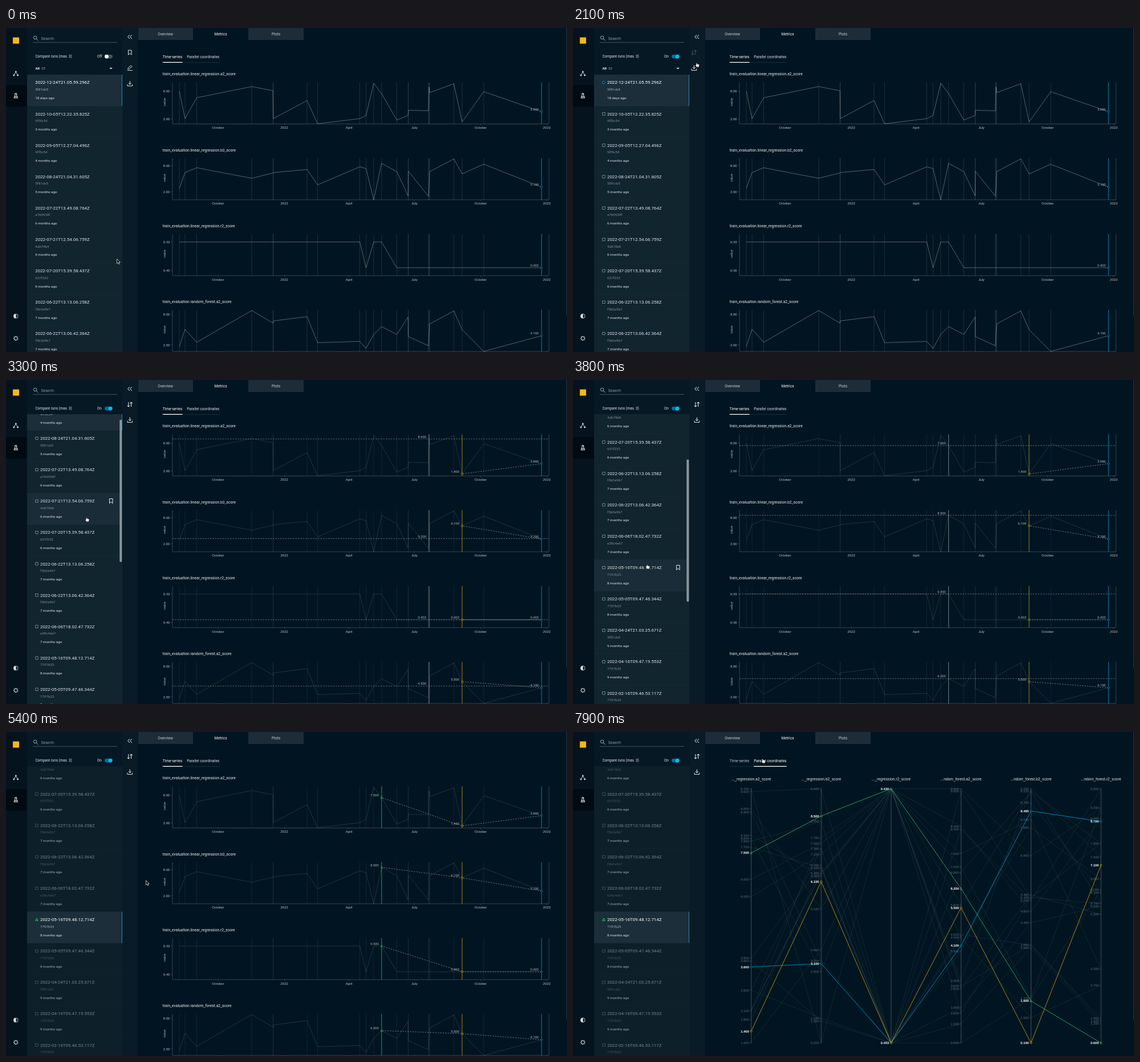
Animation, 984 px wide and 569 px high, one loop 8000 ms. Source, as an HTML page:

```html
<!DOCTYPE html>
<html lang="en">
<head>
<meta charset="utf-8">
<title>Run metrics</title>
<style>
html, body { margin: 0; width: 100%; height: 100%; overflow: hidden; background: #001521; }
svg { display: block; width: 984px; height: 569px; }
text { font-family: Roboto, sans-serif; }
text.ax { font-family: "Liberation Sans", Arial, sans-serif; }
</style>
</head>
<body>
<svg id="stage" viewBox="0 0 984 569">
  <defs><clipPath id="listClip"><rect x="37" y="60" width="168" height="509"/></clipPath></defs>
  <g id="back"></g>
  <g id="list" clip-path="url(#listClip)"></g>
  <g id="tools"></g>
  <g id="main"></g>
  <g id="cursor"></g>
</svg>
<script>
const LOOP = 8000, STEP = 100;
const ROW = 55.1, LIST_TOP = 82, SCROLL = 317.3;
const BG = '#001521', WHITE = '#fff';
const BLUE = '#00bcff', AMBER = '#ffbc00', GREEN = '#31e27b';

const runs = [
  ['2022-12-24T21.05.59.296Z', '5f81cb5', '18 days'],
  ['2022-10-05T12.22.35.825Z', '9ff5c54', '3 months'],
  ['2022-09-05T12.27.04.496Z', '9ff5c54', '4 months'],
  ['2022-08-24T21.04.31.605Z', '5f81cb5', '5 months'],
  ['2022-07-22T13.49.08.764Z', 'a7b9938f', '6 months'],
  ['2022-07-21T12.54.06.759Z', '4d678b9', '6 months'],
  ['2022-07-20T15.39.58.437Z', '637f232', '6 months'],
  ['2022-06-22T13.13.06.258Z', 'f5b3a9b7', '7 months'],
  ['2022-06-22T13.06.42.364Z', 'f5b3a9b7', '7 months'],
  ['2022-06-06T18.02.47.732Z', 'e38c4a67', '7 months'],
  ['2022-05-16T09.48.12.714Z', '7707b23', '8 months'],
  ['2022-05-05T09.47.46.344Z', '7707b23', '8 months'],
  ['2022-04-24T21.03.25.671Z', '5f81cb5', '9 months'],
  ['2022-04-16T09.47.19.553Z', '7707b23', '9 months'],
  ['2022-02-16T09.46.53.117Z', '7707b23', '11 months']
];

// Metric values run from the oldest run to the newest.
const runX = [304, 314, 334.5, 431, 468.3, 468.7, 528, 546.5, 620.5, 631.5, 645, 658.8,
  685.5, 705.3, 705.7, 741, 742, 743, 785.5, 800, 838, 939.3];
const metrics = [
  { name: 'linear_regression.a2_score', short: '..._regression.a2_score',
    axis: [8, 111, 2, 160], lo: 1, hi: 9.7,
    v: [8, 2.1, 6.6, 9, 8.1, 2.1, 6, 1, 2.1, 2.8, 9.7, 7.5, 1.8, 2.8, 3.9, 3.8, 8.9, 7.7, 9.6, 1.4, 7.9, 3.6] },
  { name: 'linear_regression.b2_score', short: '..._regression.b2_score',
    axis: [8, 241.5, 2, 287.8], lo: .2, hi: 9.5,
    v: [2.8, 6.4, 7.5, 5.1, 6.3, 6.4, 7.1, 3.6, 7.7, 7.3, .2, 8.5, 6.6, 1.1, 6.7, 1, 3.2, 6.6, 9.5, 6.1, 8.3, 3.1] },
  { name: 'linear_regression.r2_score', short: '..._regression.r2_score',
    axis: [.43, 375.8, .4, 426], lo: .403, hi: .43,
    v: runX.map((x, i) => i < 12 && i !== 9 ? .43 : .403) },
  { name: 'random_forest.a2_score', short: '...ndom_forest.a2_score',
    axis: [9, 503, 2, 556.5], lo: .5, hi: 9.9,
    v: [1.6, 5.6, 2.6, 9.9, 7, 7.5, 8.5, 2.5, 2.8, 1.2, 4.4, 6.2, 4.4, 8.4, 3.9, 1.8, 4.5, 6.8, 9.8, 5.5, .5, 4.1] },
  { short: '...ndom_forest.b2_score', lo: .1, hi: 9.2,
    v: [5.3, 9.1, 3.6, 6.8, 1.7, 8.1, 4.8, 5.4, 9.2, 3.5, 7.8, 1.6, 1, 5.2, 8.7, 4.4, 3.6, 9.1, 5.3, .1, 1.7, 8.4] },
  { short: '...ndom_forest.r2_score', lo: .6, hi: 9.9,
    v: [7.9, 5.7, 1.5, 9.2, 6.2, 3.3, 8.8, 5.3, 7.4, 1.3, 6.6, .6, 2.7, 9.9, 6.1, 5.6, 1.4, 7.9, 5.7, 7.1, 9.2, 8.7] }
];
const picks = [
  { row: 0, at: 0, color: BLUE, shape: 'diamond' },
  { row: 2, at: 2900, color: AMBER, shape: 'circle' },
  { row: 10, at: 4600, color: GREEN, shape: 'triangle' }
];
const path = [[0, 197, 410], [800, 182, 72], [900, 182, 72], [1500, 176, 52], [1600, 176, 52],
  [1800, 175, 51], [2000, 175, 51], [2100, 218, 65], [2500, 145, 226], [3200, 145, 226],
  [3500, 135, 300], [3600, 135, 300], [3800, 131, 328], [4900, 131, 328], [5400, 248, 265],
  [5800, 248, 265], [6700, 334, 51]];

const put = (id, html) => { document.getElementById(id).innerHTML = html; };
const clamp = v => Math.max(0, Math.min(1, v));
const ease = v => (v = clamp(v), v * v * (3 - 2 * v));
const line = (x1, y1, x2, y2, c, w = 1, more = '') =>
  `<line x1="${x1}" y1="${y1}" x2="${x2}" y2="${y2}" stroke="${c}" stroke-width="${w}" ${more}/>`;
const rect = (x, y, w, h, c, more = '') =>
  `<rect x="${x}" y="${y}" width="${w}" height="${h}" fill="${c}" ${more}/>`;
const text = (x, y, s, size, c = WHITE, more = '') =>
  `<text x="${x}" y="${y + size * .35}" font-size="${size}" fill="${c}" ${more}>${s}</text>`;
const shape = (d, c = WHITE, w = 1, fill = 'none', more = '') =>
  `<path d="${d}" stroke="${c}" stroke-width="${w}" fill="${fill}" ${more}/>`;
const poly = (pts, c, w, more = '') =>
  `<polyline points="${pts.join(' ')}" fill="none" stroke="${c}" stroke-width="${w}" ${more}/>`;
const at = (x, y, html, more = '') => `<g transform="translate(${x} ${y})" ${more}>${html}</g>`;
const END = 'text-anchor="end"', MID = 'text-anchor="middle"';
const DASH = 'stroke-dasharray="2.4 2" opacity=".72"';

function marker(kind, x, y, c, s = 1) {
  const d = {
    diamond: 'M0-2.5L2.5 0 0 2.5-2.5 0Z',
    circle: 'M-2 0a2 2 0 1 0 4 0a2 2 0 1 0-4 0Z',
    triangle: 'M0-2.2L2.1 1.8H-2.1Z'
  }[kind];
  return at(x, y, shape(d, c, .9, BG, `transform="scale(${s})"`));
}

const icons = {
  chevrons: shape('M0-3.4L-3.4 0 0 3.4M4-3.4L.6 0 4 3.4', WHITE, 1),
  bookmark: shape('M-2.8-4H2.8V4L0 1.6-2.8 4Z', WHITE, .9),
  pencil: shape('M-3.6 2.4L-3-.2 2-4.2 3.8-2.2-1.2 1.8ZM-4.5 4.5H4.5', WHITE, .8),
  download: shape('M0-4.5V1.5M-2.5-1L0 1.6 2.5-1M-4.3 1.5V4.3H4.3V1.5', WHITE, .9),
  sort: shape('M-2.4-4V4M-4.6 1.8L-2.4 4.2-.2 1.8M2.4 4V-4M.2-1.8L2.4-4.2 4.6-1.8', WHITE, 1)
};

function drawBack() {
  const gear = [...Array(8)].map((_, i) =>
    `<rect x="-.7" y="-4.1" width="1.4" height="1.3" fill="#ddd" transform="rotate(${i * 45})"/>`).join('');
  put('back',
    rect(0, 0, 984, 569, BG) + rect(0, 0, 37, 569, '#04131e') + rect(0, 100, 37, 38, '#000a12') +
    rect(37, 0, 167, 569, '#061823') + rect(204, 0, 27.5, 569, '#081b27') +
    rect(983, 0, 1, 505, '#2b3a44') +
    rect(12, 16.5, 11, 11, '#f5b912') +
    at(17.3, 80, shape('M0-3L-3.3 3M0-3L3.3 3', '#ddd', .9) +
      [[0, -3.2], [-3.4, 3], [3.4, 3]].map(p => `<circle cx="${p[0]}" cy="${p[1]}" r="1.4" fill="#ddd"/>`).join('')) +
    at(17.3, 119, shape('M-1.9-4H1.9M-1.2-4V-1L-3.4 3.8H3.4L1.2-1V-4M-2.3 1.5H2.3', WHITE, 1)) +
    at(17.3, 506, shape('M0-3.8a3.8 3.8 0 0 0 0 7.6Z', '#ddd', .5, '#ddd') +
      '<circle r="3.8" fill="none" stroke="#ddd" stroke-width=".8"/>') +
    at(17.3, 545, '<circle r="2.9" fill="none" stroke="#ddd" stroke-width=".8"/>' + gear) +
    '<circle cx="51.2" cy="16.8" r="2.8" fill="none" stroke="#b5bdc2" stroke-width=".9"/>' +
    line(53.3, 19, 56.5, 22, '#b5bdc2', 1) +
    text(61.5, 18, 'Search', 7.3, '#8d989f') + line(47, 25.3, 195, 25.3, '#53626c', .8) +
    text(51.5, 50, 'Compare runs (max. 3)', 6.3, '#e4e7e9') +
    rect(232, 0, 96, 21, '#1c2d39') + rect(425, 0, 97, 21, '#1c2d39') +
    text(279.5, 10.5, 'Overview', 6.6, '#c8ced2', MID) + text(376.5, 10.5, 'Metrics', 6.6, WHITE, MID) +
    text(473.5, 10.5, 'Plots', 6.6, '#c8ced2', MID));
}

function drawList(s) {
  let out = '';
  if (s.scroll < 30) {
    const y = 71 - s.scroll;
    out += text(51.5, y, 'All', 6.2, WHITE, 'font-weight="600"') + text(62, y, '22', 6.2, '#aab3b8') +
      shape(`M181.2 ${y - 1.2}h5.6l-2.8 2.8Z`, 'none', 0, '#d5dadd');
  }
  runs.forEach((run, i) => {
    const top = LIST_TOP + i * ROW - s.scroll;
    if (top > 569 || top + ROW < 60) return;
    const pick = s.picked.find(p => p.row === i), hot = s.hover === i;
    const off = s.picked.length === 3 && !pick;
    const x = s.compare ? 60 : 51.3, y = top + 13.7;
    out += rect(37, top, 167, ROW, pick ? '#1b2e3a' : hot ? '#192c37' : off ? '#0d202a' : '#11252f') +
      line(37, top + ROW, 204, top + ROW, '#2a3d47', .6, off ? 'opacity=".5"' : 'stroke-dasharray="1.5 .5"');
    if (pick) out += line(203.4, top, 203.4, top + ROW, '#2b8ab5', 1);
    if (s.compare) out += pick ? marker(pick.shape, 53.9, y, pick.color, 1.05)
      : rect(51.7, y - 2.2, 4.5, 4.5, 'none', `stroke="${off ? '#5b6972' : '#b0b9be'}" stroke-width=".6"`);
    out += text(x, y, run[0], 7.9, pick ? WHITE : off ? '#75828a' : '#dfe3e5') +
      text(x, y + 12.2, run[1], 6.2, pick ? '#a7b2b8' : off ? '#45545d' : '#7f8c94') +
      text(x, y + 27.1, run[2] + ' ago', 6.25, off ? '#a3acb1' : '#e0e4e6');
    if (hot) out += at(184.3, y, icons.bookmark);
  });
  if (s.bar > 0) out += rect(199.3, .44 * s.scroll, 4, 250, '#8b969d', `rx="2" opacity="${s.bar}"`);
  put('list', out);
}

function drawTools(s) {
  const dx = s.compare ? -5 * (1 - s.slide) : 0;
  const track = s.compare ? '#0a6d98' : '#43525c';
  put('tools',
    text(160, 50, s.compare ? 'On' : 'Off', 6.3, '#e4e7e9') +
    rect(173, 46.8, 14, 6.6, track, 'rx="3.3"') +
    `<circle cx="${s.compare ? 183 : 176.5}" cy="50.1" r="3.4" fill="${s.compare ? BLUE : WHITE}"/>` +
    at(217, 15.5, icons.chevrons) +
    (s.compare
      ? at(217.3 + dx, 43, icons.sort, `opacity="${.25 + .75 * s.slide}"`) + at(217.3 + dx, 70, icons.download)
      : at(217.3, 43, icons.bookmark) + at(217.3, 70, icons.pencil) + at(217.3, 97.5, icons.download)));
}

function chart(m, i, s) {
  const top = 95.5 + i * 133.2, base = top + 73;
  const [v1, y1, v2, y2] = m.axis;
  const yOf = v => +(y1 + (v1 - v) / (v1 - v2) * (y2 - y1)).toFixed(2);
  const pts = m.v.map((v, k) => [runX[k], yOf(v)]);
  const busy = s.picked.length > 1 || s.chartHover >= 0;
  const axis = '#56656f';
  let out = text(274.8, top - 14.5, 'train_evaluation.' + m.name, 6.7, '#eceff0') +
    shape(`M292 ${top}V${base}H952.3V${top}`, axis, .6);
  for (const [v, y] of [[v1, y1], [v2, y2]])
    out += text(287.5, y, v.toFixed(2), 6.1, '#bcc4c8', `class="ax" ${END}`) + line(289.3, y, 292, y, axis, .6);
  out += at(278, top + 34.5, text(0, 0, 'value', 6, '#a9b2b7', `class="ax" ${MID} transform="rotate(-90)"`));
  ['October', '2022', 'April', 'July', 'October', '2023'].forEach((label, k) => {
    const x = [372, 488.2, 601.7, 716.5, 832.5, 948.5][k];
    out += text(x, base + 6.5, label, 6, '#bcc4c8', `class="ax" ${MID}`) + line(x, base, x, base + 1.8, axis, .6);
  });
  out += runX.map(x => line(x, top, x, base, WHITE, .6, `opacity="${busy ? .11 : .19}"`)).join('') +
    poly(pts, WHITE, .6, `opacity="${busy ? .21 : .55}"`);

  const label = p => text(p[0] - 5, p[1] - 4, m.v[runX.indexOf(p[0])].toFixed(3), 5.8, '#b4bcc0', END);
  if (s.chartHover >= 0) {
    const p = pts[21 - s.chartHover];
    out += line(292, p[1], 952.3, p[1], WHITE, .55, DASH);
    if (!s.picked.some(q => q.row === s.chartHover))
      out += line(p[0], top, p[0], base, '#c5ccd0', .9, 'opacity=".6"') + label(p);
  }
  const chosen = s.picked.map(p => ({ ...p, p: pts[21 - p.row] }));
  for (const c of chosen) out += line(c.p[0], top, c.p[0], base, c.color, .9, 'opacity=".65"');
  out += poly(chosen.map(c => c.p), WHITE, .55, DASH);
  for (const c of chosen) out += label(c.p) + marker(c.shape, ...c.p, c.color, .75);
  return out;
}

function parallel(s) {
  const axisX = i => 312.6 + i * 122.7;
  const yOf = (m, v) => +(546 - (v - m.lo) / (m.hi - m.lo) * 446.5).toFixed(2);
  const track = k => metrics.map((m, i) => [axisX(i), yOf(m, m.v[k])]);
  const chosen = s.picked.map(p => 21 - p.row);
  let out = '';
  runX.forEach((x, k) => {
    if (!chosen.includes(k)) out += poly(track(k), WHITE, .6, 'opacity=".13"');
  });
  metrics.forEach((m, i) => {
    const x = axisX(i), bold = chosen.map(k => m.v[k]);
    out += text(x, 82.5, m.short, 6.7, '#e8ebec', `class="ax" ${MID}`) +
      line(x, 99.5, x, 546, '#52616b', .8);
    for (const v of new Set(m.v)) {
      const y = yOf(m, v), on = bold.includes(v);
      out += line(x - 2.5, y, x, y, '#52616b', .6) +
        text(x - 3.8, y, v.toFixed(3), 5.8, on ? WHITE : '#5d6a73',
          `class="ax" ${END}${on ? ' font-weight="bold"' : ''}`);
    }
  });
  s.picked.forEach((p, n) => {
    const pts = track(chosen[n]);
    out += poly(pts, p.color, .9, 'opacity=".75"') +
      pts.map(q => marker(p.shape, ...q, p.color, .75)).join('');
  });
  return out;
}

function drawMain(s) {
  const par = s.fade > 0;
  put('main',
    text(274.8, 50.7, 'Time-series', 6.6, par ? '#bcc4c8' : WHITE) +
    text(317.2, 50.7, 'Parallel coordinates', 6.5, par ? WHITE : '#dce0e2') +
    line(274.8, 60.6, 374.5, 60.6, '#2a3a44', .7) +
    (par ? line(317.2, 60.4, 374.5, 60.4, WHITE, 1.1) : line(274.8, 60.4, 309.5, 60.4, WHITE, 1.1)) +
    (par ? `<g opacity="${s.fade}">${parallel(s)}</g>`
      : metrics.slice(0, 4).map((m, i) => chart(m, i, s)).join('')));
}

function drawCursor(s) {
  const arrow = shape('M-2.4-4.3V3.6L-.6 2 .6 4.7 2 4.1.8 1.5H3.3Z', WHITE, .7, '#000');
  const hand = shape('M-1.7-3.6c.9-.7 1.4.1 1.6 1.8l2.7.6c.9.3.9 1 .7 2l-.7 2.9h-3.7' +
    'l-2.3-3c-.3-.9.6-1.1 1.3-.4Z', '#000', .5, WHITE);
  put('cursor', at(s.x, s.y, s.hand ? hand : arrow));
}

function cursorAt(t) {
  const n = path.findIndex(p => p[0] > t);
  if (n < 0) return path[path.length - 1].slice(1);
  const [a, b] = [path[n - 1], path[n]], k = ease((t - a[0]) / (b[0] - a[0]));
  return [a[1] + (b[1] - a[1]) * k, a[2] + (b[2] - a[2]) * k];
}

function render(t) {
  const [x, y] = cursorAt(t);
  const scroll = SCROLL * ease((t - 3100) / 400);
  const compare = t >= 2100;
  const row = Math.floor((y + scroll - LIST_TOP) / ROW);
  const hover = x > 37 && x < 194 && y > 60 && row >= 0 ? row : -1;
  const s = {
    x, y, scroll, compare, hover,
    chartHover: compare ? hover : -1,
    hand: hover >= 0 || (t >= 1500 && t < 2200) || t >= 6600,
    slide: clamp((t - 2100) / 300),
    picked: picks.filter(p => t >= p.at),
    bar: t < 3200 ? 0 : 1 - clamp((t - 3800) / 300),
    fade: t < 7500 ? 0 : clamp(.4 + (t - 7500) / 333)
  };
  drawList(s);
  drawTools(s);
  drawMain(s);
  drawCursor(s);
}

const start = performance.now();
let last = -1;
function tick() {
  const t = Math.floor((performance.now() - start) % LOOP / STEP) * STEP;
  if (t !== last) render(last = t);
  requestAnimationFrame(tick);
}
drawBack();
tick();
</script>
</body>
</html>
```
